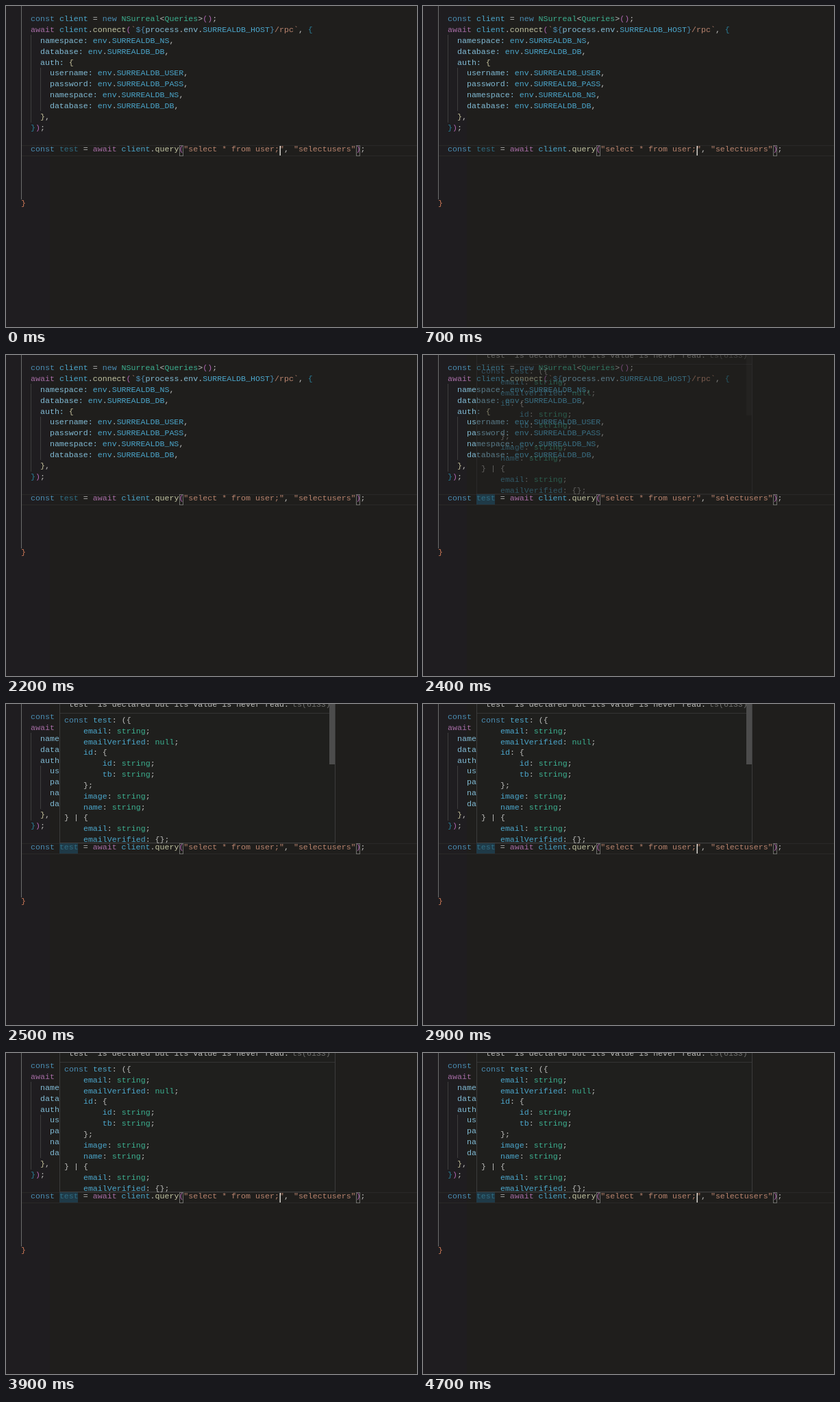
An HTML page with a canvas for the animation above (5100 ms loop, 600 by 468 pixels).

```html
<!DOCTYPE html>
<html lang="en">
<head>
<meta charset="utf-8">
<title>Editor hover</title>
<style>
html, body { margin: 0; width: 100%; height: 100%; overflow: hidden; background: #1f1e1c; }
canvas { display: block; width: 600px; height: 468px; }
</style>
</head>
<body>
<canvas id="stage" width="600" height="468"></canvas>
<script>
const ctx = document.getElementById('stage').getContext('2d');
const LOOP = 5100, STEP = 100;
const COL = 6.98, ROW = 15.83;

// Colour keys used by the "~x" marks in the text below
const INK = {
  k: '#4a8db3', // keyword
  a: '#a66ca4', // await
  v: '#4ba6cb', // constant
  p: '#82bcd6', // property
  t: '#3cb090', // type
  f: '#c2c4a2', // function
  s: '#b9846e', // string
  w: '#bdbdbb', // plain
  o: '#b066b2', // outer bracket
  b: '#2a7f98', // inner bracket
  g: '#c4c09a', // third bracket
  r: '#d07a58', // closing brace
  u: '#2f6c82', // unused name
  d: '#6e6e6c'  // faint
};

const CODE = [
  '~kconst ~vclient ~w= ~knew ~tNSurreal~w<~tQueries~w>~o()~w;',
  '~aawait ~vclient~w.~fconnect~o(~s`~k${~pprocess~w.~penv~w.~vSURREALDB_HOST~k}~s/rpc`~w, ~b{',
  '  ~pnamespace: ~venv~w.~vSURREALDB_NS~w,',
  '  ~pdatabase: ~venv~w.~vSURREALDB_DB~w,',
  '  ~pauth: ~g{',
  '    ~pusername: ~venv~w.~vSURREALDB_USER~w,',
  '    ~ppassword: ~venv~w.~vSURREALDB_PASS~w,',
  '    ~pnamespace: ~venv~w.~vSURREALDB_NS~w,',
  '    ~pdatabase: ~venv~w.~vSURREALDB_DB~w,',
  '  ~g}~w,',
  '~b}~o)~w;',
  '',
  '~kconst ~utest ~w= ~aawait ~vclient~w.~fquery~o(~s"select * from user;"~w, ~s"selectusers"~o)~w;'
];

const HOVER = [
  '~kconst ~vtest~w: ({',
  '    ~vemail~w: ~tstring~w;',
  '    ~vemailVerified~w: ~tnull~w;',
  '    ~vid~w: {',
  '        ~vid~w: ~tstring~w;',
  '        ~vtb~w: ~tstring~w;',
  '    ~w};',
  '    ~vimage~w: ~tstring~w;',
  '    ~vname~w: ~tstring~w;',
  '~w} | {',
  '    ~vemail~w: ~tstring~w;',
  '    ~vemailVerified~w: {};'
];

function rect(color, x, y, w, h) {
  ctx.fillStyle = color;
  ctx.fillRect(x, y, w, h);
}

function line(text, x, y) {
  ctx.fillStyle = INK.w;
  text.split(/(~[a-z])/).forEach(part => {
    if (/^~[a-z]$/.test(part)) {
      ctx.fillStyle = INK[part[1]];
      return;
    }
    ctx.fillText(part, x, y);
    x += part.length * COL;
  });
}

function block(rows, x, y) {
  rows.forEach((row, i) => line(row, x, y + i * ROW));
}

function bracketBox(x) {
  ctx.strokeStyle = '#6f706c';
  ctx.strokeRect(x + 0.5, 203.5, 5, 15);
}

function editor(hovering) {
  rect('#1f1e1c', 0, 0, 600, 468);
  rect('#1f1d20', 0, 0, 64, 468);
  rect('#2a2928', 23, 203, 577, 1);
  rect('#2a2928', 23, 218, 577, 1);
  rect('#6c6c6c', 22, 0, 1, 282);
  rect('#3e3e3e', 36, 42, 1, 128);
  rect('#3e3e3e', 50, 90, 1, 63);
  if (hovering) rect('#1f3a47', 78, 203, 27, 15);
  bracketBox(253);
  bracketBox(511);
  block(CODE, 36, 22.3);
  line('~r}', 22, 22.3 + 17 * ROW);
}

function hover(alpha, bar) {
  ctx.save();
  ctx.beginPath();
  ctx.rect(78, 0, 403, 203);
  ctx.clip();
  ctx.globalAlpha = alpha;
  rect('#1f1f1d', 78, 0, 403, 203);
  rect('#3c3c3c', 78, 0, 1, 203);
  rect('#3c3c3c', 480, 0, 1, 203);
  rect('#3c3c3c', 78, 202, 403, 1);
  rect('#343434', 79, 13, 401, 1);
  line("~w'test' is declared but its value is never read.", 85, 4);
  line('~dts(6133)', 418, 4);
  block(HOVER, 85, 27);
  ctx.globalAlpha = alpha * bar;
  rect('#4c4c4c', 472, 0, 8, 88);
  ctx.restore();
}

// The scrollbar fades in with the popup, rests, then fades out
function barAlpha(t) {
  if (t < 2500) return 0.25;
  return t < 3500 ? Math.min(1, 1 - (t - 2900) / 650) : 0;
}

function draw(now) {
  const t = Math.floor(now % LOOP / STEP) * STEP;
  const hovering = t >= 2400;
  ctx.font = '11.63px "Liberation Mono", "Courier New", monospace';
  ctx.textBaseline = 'alphabetic';
  ctx.lineWidth = 1;
  editor(hovering);
  if (hovering) hover(t < 2500 ? 0.42 : 1, barAlpha(t));
  // Caret toggles every half second
  const caretOn = Math.floor((t + 300) / 500) % 2 === 0;
  if (caretOn) rect('#d4d2cc', 399.5, 204, 1.5, 14);
}

const start = performance.now();
function tick() {
  draw(performance.now() - start);
  requestAnimationFrame(tick);
}
tick();
</script>
</body>
</html>
```
